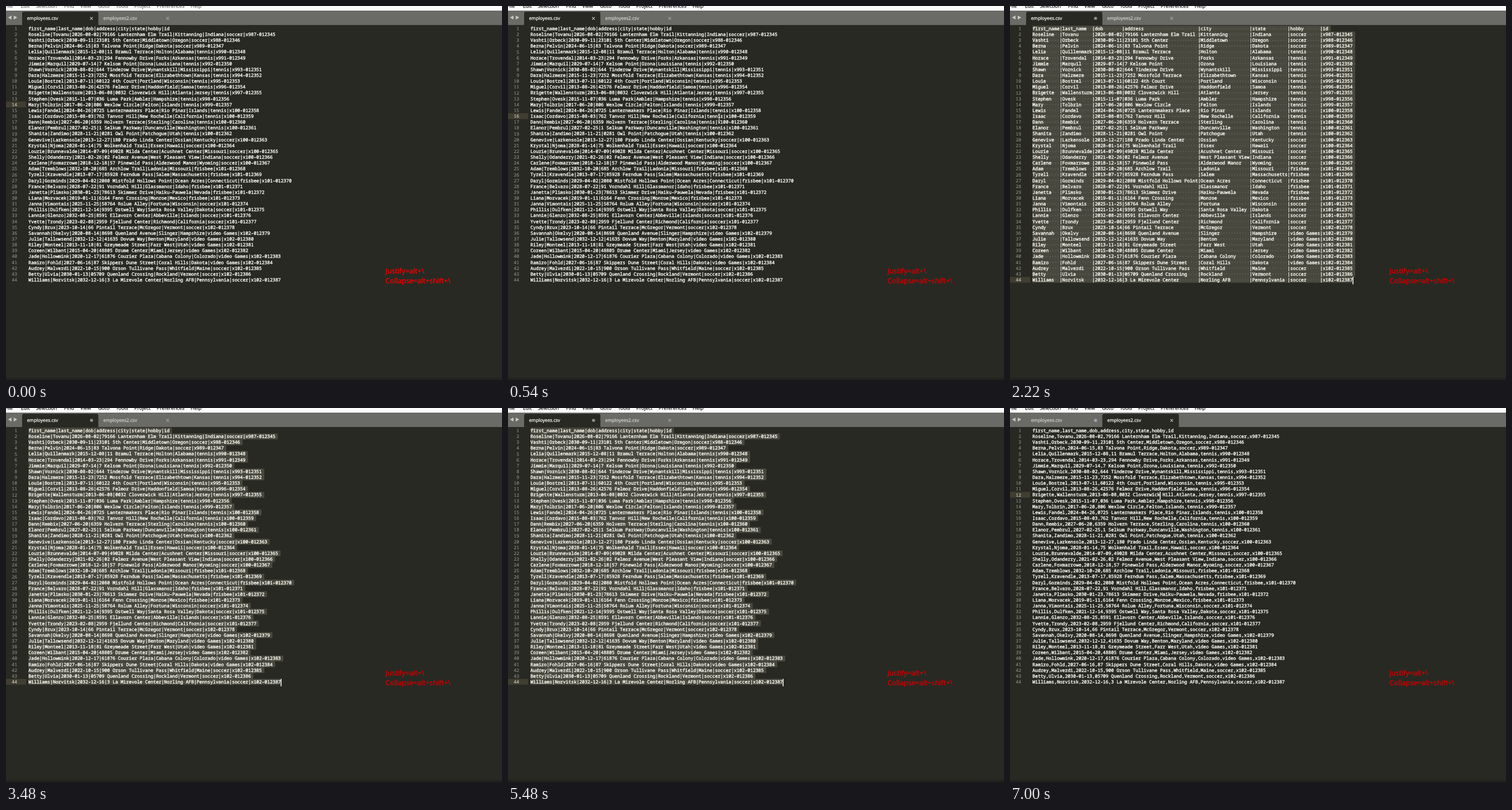
An HTML page with a canvas for the animation above (8 s loop, 862 px wide and 649 px high).

```html
<!DOCTYPE html>
<html lang="en">
<head>
<meta charset="utf-8">
<title>Column justify</title>
<style>
html, body { margin: 0; width: 100%; height: 100%; overflow: hidden; background: #282923; }
canvas { display: block; }
</style>
</head>
<body>
<canvas id="stage" width="862" height="649"></canvas>
<script>
const ctx = document.getElementById("stage").getContext("2d");
const LOOP = 8000, LEFT = 39, TOP = 34, CELL = 4.72, ROW = 10.14;
const MONO = `${CELL / 0.6}px "Noto Sans Mono", "DejaVu Sans Mono", monospace`;
const sans = size => `${size}px "Open Sans", "Noto Sans", sans-serif`;
const C = {
  paper: "#282923", bar: "#6a6b66", text: "#f8f8f2", select: "#49483e",
  dot: "#66675c", selectDot: "#85847a", number: "#8f908a", line: "#403d31"
};

const PEOPLE = `Roseline|Tovanu|2026-08-02|79166 Lanternham Elm Trail|Kittanning|Indiana
Vashti|Orbeck|2030-09-11|23101 5th Center|Middletown|Oregon
Berna|Pelvin|2024-06-15|83 Talvona Point|Ridge|Dakota
Lelia|Quillenmark|2015-12-08|11 Bramul Terrace|Holton|Alabama
Horace|Trovendal|2014-03-23|294 Fennowby Drive|Forks|Arkansas
Jimmie|Marquil|2029-07-14|7 Kelsom Point|Ozona|Louisiana
Shawn|Vornick|2030-08-02|644 Tinderow Drive|Wynantskill|Mississippi
Dara|Halzmere|2015-11-23|7252 Mossfold Terrace|Elizabethtown|Kansas
Louie|Bostrel|2013-07-11|60122 4th Court|Portland|Wisconsin
Miguel|Corvil|2013-08-26|42576 Felmor Drive|Haddonfield|Samoa
Brigette|Wallensturm|2013-06-08|0032 Cloverwick Hill|Atlanta|Jersey
Stephen|Ovesk|2015-11-07|036 Luma Park|Ambler|Hampshire
Mary|Tolbrin|2017-06-20|806 Wexlow Circle|Felton|Islands
Lewis|Fandel|2024-04-26|0725 Lanternmakers Place|Rio Pinar|Islands
Isaac|Cordavo|2015-08-03|762 Tanvor Hill|New Rochelle|California
Dann|Rembix|2027-06-20|6359 Holvern Terrace|Sterling|Carolina
Elanor|Pembrul|2027-02-25|1 Selkum Parkway|Duncanville|Washington
Shanita|Zandimo|2028-11-21|0281 Owl Point|Patchogue|Utah
Genevive|Larkensole|2013-12-27|180 Prado Linda Center|Ossian|Kentucky
Krystal|Njoma|2028-01-14|75 Wolkenhald Trail|Essex|Hawaii
Lourie|Brunnevalde|2014-07-09|49028 Milda Center|Acushnet Center|Missouri
Shelly|Odanderry|2021-02-26|02 Felmor Avenue|West Pleasant View|Indiana
Carlene|Foxmarrowe|2018-12-18|57 Pinewold Pass|Alderwood Manor|Wyoming
Adam|Tremblows|2032-10-20|685 Archlow Trail|Ladonia|Missouri
Tyrell|Kravendle|2013-07-17|85928 Ferndum Pass|Salem|Massachusetts
Daryl|Gorminds|2029-04-02|2080 Mistfold Hollows Point|Ocean Acres|Connecticut
France|Belvaro|2028-07-22|91 Vorndahl Hill|Glassmanor|Idaho
Janetta|Plimsko|2030-01-23|78613 Skimmer Drive|Haiku-Pauwela|Nevada
Liana|Morvacek|2019-01-11|6164 Fenn Crossing|Monroe|Mexico
Janna|Vimontais|2025-11-25|58764 Rolum Alley|Fortuna|Wisconsin
Phillis|Dulfken|2021-12-14|9395 Ostwell Way|Santa Rosa Valley|Dakota
Lannie|Glenzo|2032-08-25|8591 Ellavorn Center|Abbeville|Islands
Yvette|Trondy|2023-02-08|2959 Fjellund Center|Richmond|California
Cyndy|Brux|2023-10-14|66 Pintail Terrace|McGregor|Vermont
Savannah|Okelvy|2020-08-14|8698 Quenland Avenue|Slinger|Hampshire
Julie|Tallowsend|2032-12-12|41635 Dovum Way|Benton|Maryland
Riley|Monteel|2013-11-18|81 Greymeade Street|Farr West|Utah
Coreen|Wilbant|2015-04-20|48805 Drume Center|Miami|Jersey
Jade|Hollowmink|2020-12-17|61876 Courier Plaza|Cabana Colony|Colorado
Ramiro|Fohld|2027-06-16|87 Skippers Dune Street|Coral Hills|Dakota
Audrey|Malverdi|2022-10-15|900 Orson Tullivane Pass|Whitfield|Maine
Betty|Ulvia|2030-01-13|05709 Quenland Crossing|Rockland|Vermont
Williams|Norvitsk|2032-12-16|3 La Mirevole Center|Norling AFB|Pennsylvania`;

const HOBBIES = [["soccer", 3], ["tennis", 15], ["soccer", 5], ["frisbee", 6],
  ["soccer", 5], ["video Games", 6], ["soccer", 3]].flatMap(([name, n]) => Array(n).fill(name));
const employeeId = i => `x${i < 13 ? 987 + i : 100 + Math.floor((i - 13) / 10)}-0${12345 + i}`;

const table = [
  "first_name|last_name|dob|address|city|state|hobby|id".split("|"),
  ...PEOPLE.split("\n").map((row, i) => [...row.split("|"), HOBBIES[i], employeeId(i)])
];
const widths = table[0].map((_, c) => Math.max(...table.map(row => row[c].length)));
const VIEWS = {
  pipes: table.map(row => row.join("|")),
  justified: table.map(row => row.map((s, c) => c < 7 ? s.padEnd(widths[c]) : s).join("|")),
  commas: table.map(row => row.join(","))
};

const SCENES = [
  { from: 0, view: "pipes", line: 14 },
  { from: 540, view: "pipes", line: 16 },
  { from: 1420, view: "pipes", line: 16, caret: 69 },
  { from: 2220, view: "justified", line: 44, selected: true },
  { from: 3480, view: "pipes", line: 44, selected: true },
  { from: 4470, view: "justified", line: 44, selected: true },
  { from: 5480, view: "pipes", line: 44, selected: true },
  { from: 7000, view: "commas", line: 12, caret: 47, second: true }
];

function rect(x, y, w, h, color, radius = 0) {
  ctx.fillStyle = color;
  ctx.beginPath();
  ctx.roundRect(x, y, w, h, radius);
  ctx.fill();
}

// A hairline outline gives small text the weight of screen-hinted type.
function label(text, x, y, font, color, align = "left", weight = 0.25) {
  ctx.font = font;
  ctx.fillStyle = ctx.strokeStyle = color;
  ctx.lineWidth = weight;
  ctx.lineJoin = "round";
  ctx.textAlign = align;
  ctx.fillText(text, x, y);
  ctx.strokeText(text, x, y);
}

function arrow(x, dir) {
  ctx.fillStyle = "#c9cac5";
  ctx.beginPath();
  ctx.moveTo(x + 3 * dir, 20);
  ctx.lineTo(x - 3 * dir, 16.5);
  ctx.lineTo(x - 3 * dir, 23.5);
  ctx.fill();
}

function closeMark(x, y, color) {
  ctx.strokeStyle = color;
  ctx.lineWidth = 1.1;
  ctx.beginPath();
  for (const d of [-1, 1]) {
    ctx.moveTo(x - 2.3, y - 2.3 * d);
    ctx.lineTo(x + 2.3, y + 2.3 * d);
  }
  ctx.stroke();
}

function drawChrome(t, second) {
  rect(0, 0, 862, 8, "#fcfcfc");
  const menu = [["File", -2], ["Edit", 26], ["Selection", 52], ["Find", 101], ["View", 129],
    ["Goto", 160], ["Tools", 191], ["Project", 223], ["Preferences", 262], ["Help", 321]];
  for (const [name, x] of menu) label(name, x, 3.4, sans(8.7), t < 540 ? "#6d6d6d" : "#1c1c1c");

  rect(0, 8, 862, 25, C.bar);
  arrow(6.5, -1);
  arrow(16.5, 1);
  rect(second ? 160.5 : 28, 10, second ? 133 : 132.5, 24, C.paper, [3, 3, 0, 0]);
  const idle = "#d0d1cc", live = "#ffffff";
  label("employees.csv", 36.5, 24, sans(8), second ? idle : live);
  label("employees2.csv", 169, 24, sans(8), second ? live : idle);
  if (t < 2220) closeMark(148.5, 21.5, "#c4c4be");
  else rect(146, 18.7, 5.4, 5.4, second ? "#a0a4aa" : "#8b8b86", 2.7);
  closeMark(281, 21.5, second ? "#c4c4be" : "#a3a49f");
  rect(0, 645, 862, 4, "#22231e");
}

function drawLine(text, i, scene) {
  const y = TOP + i * ROW, active = i + 1 === scene.line, last = i === table.length - 1;
  if (active) rect(0, y, 35, ROW, C.line);
  if (scene.selected) {
    rect(LEFT, y, text.length * CELL + (last ? 0 : 4), ROW + 0.2, C.select, [0, 1.5, 1.5, 0]);
  }
  label(i + 1, 19.5, y + 8, MONO, active ? "#d6d6cf" : C.number, "right", 0.1);
  label(text, LEFT, y + 7.9, MONO, C.text, "left", 0.4);
  ctx.fillStyle = scene.selected ? C.selectDot : C.dot;
  for (const { index } of text.matchAll(/ /g)) {
    ctx.fillRect(LEFT + (index + 0.5) * CELL - 0.5, y + 4.8, 1, 1);
  }
}

function drawCaret(line, column) {
  rect(LEFT + column * CELL - 0.6, TOP + (line - 1) * ROW, 1.5, 13, C.text);
}

function drawBeam(x, y) {
  rect(x - 0.5, y - 6, 1, 12, "#dcdcd6");
  for (const end of [-6, 5.2]) rect(x - 2.5, y + end, 5, 0.8, "#bcbcb6");
}

// The pointer sweeps from the lower right corner in five steps.
function drawPointer(t) {
  if (t < 70 || t >= 610) return;
  const step = Math.min(4, Math.floor((t - 70) / 67.5)) / 4;
  const p = step * step * (3 - 2 * step);
  drawBeam(824 - 457 * p, 637 - 444 * p);
}

function drawHint(t) {
  const color = t < 70 ? "#ff0000" : "#d80000";
  label("Justify=alt+\\", 659.5, 463.5, sans(12.25), color);
  label("Collapse=alt+shift+\\", 659.5, 480.5, sans(12.25), color);
}

function draw(t) {
  const scene = SCENES.findLast(s => t >= s.from);
  const lines = VIEWS[scene.view];
  ctx.textRendering = "geometricPrecision";
  rect(0, 0, 862, 649, C.paper);
  drawChrome(t, scene.second);
  lines.forEach((text, i) => drawLine(text, i, scene));
  const column = scene.selected ? lines[43].length : scene.caret;
  if (column) drawCaret(scene.line, column);
  drawHint(t);
  drawPointer(t);
}

function tick() {
  draw(performance.now() % LOOP);
  requestAnimationFrame(tick);
}
tick();
</script>
</body>
</html>
```
